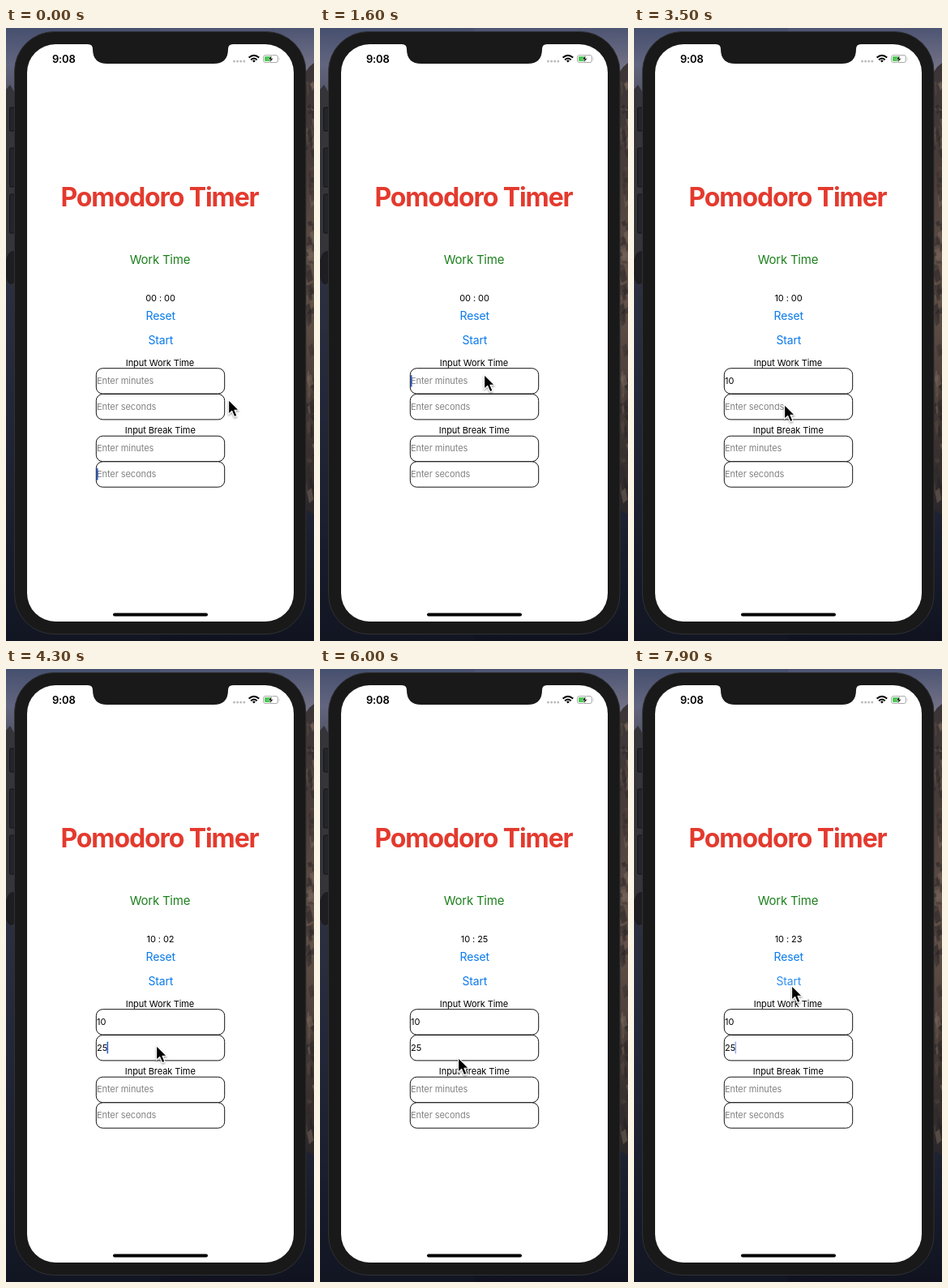
Write an HTML page that moves like this. It is 380x756 px and loops after 8 s.

```html
<!DOCTYPE html>
<html lang="en">
<head>
<meta charset="utf-8">
<title>Pomodoro Timer</title>
<style>
  html, body { margin: 0; width: 100%; height: 100%; overflow: hidden; background: #151826; }
  svg { display: block; width: 380px; height: 756px; }
  text { font-family: Inter, "Liberation Sans", sans-serif; font-size: 11px; letter-spacing: -.08px; }
  .mid { text-anchor: middle; }
  .title { font-size: 32px; font-weight: 700; letter-spacing: -1.1px; fill: #e43a2e; }
  .mode { font-size: 15px; letter-spacing: -.25px; fill: #1c801c; }
  .link { font-size: 14px; letter-spacing: -.15px; fill: #0a7aec; }
  .clock { font-size: 13px; font-weight: 600; letter-spacing: -.2px; }
  .field { fill: #fff; stroke: #111; stroke-width: 1; }
</style>
</head>
<body>
<svg viewBox="0 0 380 756">
  <defs>
    <linearGradient id="leftSky" x2="0" y2="1">
      <stop offset="0" stop-color="#46506f"/>
      <stop offset=".06" stop-color="#62657f"/>
      <stop offset=".12" stop-color="#50505f"/>
      <stop offset=".38" stop-color="#2d3040"/>
      <stop offset=".6" stop-color="#232839"/>
      <stop offset="1" stop-color="#121522"/>
    </linearGradient>
    <linearGradient id="rightSky" x2="0" y2="1">
      <stop offset="0" stop-color="#4d5573"/>
      <stop offset=".07" stop-color="#777488"/>
      <stop offset=".8" stop-color="#1d2130"/>
      <stop offset="1" stop-color="#10131f"/>
    </linearGradient>
    <linearGradient id="cliff" x2="0" y2="1">
      <stop offset="0" stop-color="#3b3436"/>
      <stop offset=".25" stop-color="#4a3d39"/>
      <stop offset=".5" stop-color="#66554b"/>
      <stop offset=".75" stop-color="#463a35"/>
      <stop offset="1" stop-color="#2a2628"/>
    </linearGradient>
    <filter id="soft" x="-50%" y="-50%" width="200%" height="200%">
      <feDropShadow dx="0" dy="1.5" stdDeviation="1.3" flood-opacity=".4"/>
    </filter>
  </defs>

  <rect width="190" height="756" fill="url(#leftSky)"/>
  <rect x="190" width="190" height="756" fill="url(#rightSky)"/>
  <path d="M0 76 L5 70 L12 82 V316 L6 318 L0 290Z" fill="#343439"/>
  <path d="M0 286 Q4 272 12 276 V312 Q5 322 0 308Z" fill="#1d1d22"/>
  <path d="M366 60 L374 48 L380 43 V600 L366 592Z" fill="url(#cliff)"/>
  <g id="rocks"></g>

  <g fill="#24252a" stroke="#111" stroke-width=".8">
    <rect x="4.5" y="98" width="8" height="29" rx="1.5"/>
    <rect x="4.5" y="148" width="8" height="48" rx="1.5"/>
    <rect x="4.5" y="205" width="8" height="48" rx="1.5"/>
  </g>
  <rect x="10.5" y="4.5" width="359.5" height="743" rx="49" fill="#191919" stroke="#303136"/>
  <rect x="26" y="20" width="329" height="712" rx="35" fill="#fff"/>
  <path d="M101 19 V20 Q107 20 107 26 Q107 44 125 44 H256 Q274 44 274 26 Q274 20 280 20 V19Z" fill="#191919"/>

  <text class="clock" x="57" y="42.5">9:08</text>
  <g fill="#bdbdbf">
    <circle cx="281.5" cy="41" r="1.5"/><circle cx="285.6" cy="41" r="1.5"/>
    <circle cx="289.7" cy="41" r="1.5"/><circle cx="293.8" cy="41" r="1.5"/>
  </g>
  <g fill="none" stroke="#000" stroke-width="2">
    <path d="M299.6 36.6 Q305.9 31 312.2 36.6"/>
    <path d="M302.1 39.2 Q305.9 35.8 309.7 39.2"/>
    <path d="M304 40.4 Q305.9 38.8 307.8 40.4 L305.9 42.6Z" fill="#000" stroke="none"/>
  </g>
  <rect x="317.5" y="33.5" width="18" height="9" rx="2.5" fill="#fff" stroke="#aaa"/>
  <path d="M337.2 36.4 Q338.6 38 337.2 39.6Z" fill="#aaa"/>
  <rect x="319" y="35" width="8.5" height="6" rx="1.2" fill="#4cc754"/>
  <path d="M328 33.4 L323.5 38.7 H326.3 L325.1 42.8 L329.8 37.4 H327Z" stroke="#fff" stroke-width=".5"/>

  <text class="mid title" x="189.5" y="220">Pomodoro Timer</text>
  <text class="mid mode" x="190" y="290.5">Work Time</text>
  <text class="mid" id="timer" x="190.5" y="336.5"></text>
  <text class="mid link" x="190.8" y="360">Reset</text>
  <text class="mid link" id="start" x="190.8" y="390">Start</text>
  <text class="mid" x="190" y="416.5">Input Work Time</text>
  <text class="mid" x="190.3" y="500">Input Break Time</text>
  <g id="fields"></g>
  <rect id="caret" width="1.6" height="15" rx=".8" fill="#2f62d9"/>
  <rect x="132" y="721.5" width="117" height="4" rx="2"/>

  <path id="pointer" filter="url(#soft)" stroke="#fff" stroke-width="1.1" stroke-linejoin="round"
    d="M.6 .6 V18.2 L4.7 14.4 L7.8 21.6 L11 20.2 L8 13.2 H13.2Z"/>
</svg>
<script>
const LOOP = 8000, STEP = 100;
const $ = id => document.getElementById(id);

function add(parent, tag, attrs) {
  const el = document.createElementNS('http://www.w3.org/2000/svg', tag);
  for (const k in attrs) el.setAttribute(k, attrs[k]);
  return parent.appendChild(el);
}

// Cliff texture along the right edge
let seed = 11;
const rnd = () => (seed = seed * 16807 % 2147483647) / 2147483647;
const tones = ['#272326', '#302a2a', '#57483f', '#77655a', '#3a3130'];
for (let i = 0; i < 95; i++) {
  const x = 368 + rnd() * 10, y = 62 + rnd() * 515, w = 2 + rnd() * 5, h = 3 + rnd() * 12;
  add($('rocks'), 'path', {
    d: `M${x} ${y}l${w} ${-h / 3}l${w / 2} ${h}l${-w} ${h / 3}Z`,
    fill: tones[Math.floor(rnd() * tones.length)], opacity: .55
  });
}

const rows = [419.7, 451.5, 503.2, 534.8];
const inputs = rows.map((y, i) => {
  add($('fields'), 'rect', { class: 'field', x: 111.3, y, width: 158.4, height: 31.4, rx: 8 });
  return { el: add($('fields'), 'text', { x: 112, y: y + 19.2 }), hint: i % 2 ? 'Enter seconds' : 'Enter minutes' };
});

// [time, field, value, caret x]
const edits = [
  [-300, 3, '', 112], [500, 0, '', 112], [2300, 0, '1', 116.3], [2800, 0, '10', 123.6],
  [3600, 1, '', 112], [4000, 1, '2', 118.3], [4300, 1, '25', 124.5]
];
const timer = [
  [0, '00 : 00'], [2500, '01 : 00'], [2900, '10 : 00'], [4100, '10 : 02'],
  [4400, '10 : 25'], [6300, '10 : 24'], [7300, '10 : 23']
];
const path = [
  [0, 274, 458], [100, 274, 458], [500, 202, 427], [2900, 202, 427], [3400, 185, 464],
  [4300, 185, 464], [4800, 201, 392], [5400, 201, 392], [5900, 170, 479],
  [6700, 170, 479], [7500, 194, 390], [LOOP, 194, 390]
];
const presses = [[5200, 5400], [7800, 8000]];

const latest = (list, t) => list.filter(e => e[0] <= t).pop();
const clamp = v => Math.max(0, Math.min(1, v));

function pointerAt(t) {
  const i = path.findIndex(p => p[0] > t);
  const [t0, x0, y0] = path[i - 1], [t1, x1, y1] = path[i];
  const u = (t - t0) / (t1 - t0), e = u * u * (3 - 2 * u);
  return [x0 + (x1 - x0) * e, y0 + (y1 - y0) * e];
}

// Solid, fade out, hidden, fade in
function blink(ms) {
  const p = ms % 1000;
  return p < 800 ? clamp((700 - p) / 200) : clamp((p - 800) / 200);
}

function draw(t) {
  const values = ['', '', '', ''];
  for (const [at, field, value] of edits) if (at <= t) values[field] = value;
  inputs.forEach(({ el, hint }, i) => {
    el.textContent = values[i] || hint;
    el.setAttribute('fill', values[i] ? '#000' : '#838383');
  });
  const [at, field, , x] = latest(edits, t);
  const caret = $('caret');
  caret.setAttribute('x', x);
  caret.setAttribute('y', rows[field] + 8);
  caret.setAttribute('opacity', blink(t - at));
  $('timer').textContent = latest(timer, t)[1];
  $('start').setAttribute('opacity', presses.some(([a, b]) => t >= a && t < b) ? .85 : 1);
  $('pointer').setAttribute('transform', `translate(${pointerAt(t)})`);
}

const origin = performance.now();
function tick() {
  const t = (performance.now() - origin) % LOOP;
  draw(Math.floor(t / STEP) * STEP);
  requestAnimationFrame(tick);
}
tick();
</script>
</body>
</html>
```
